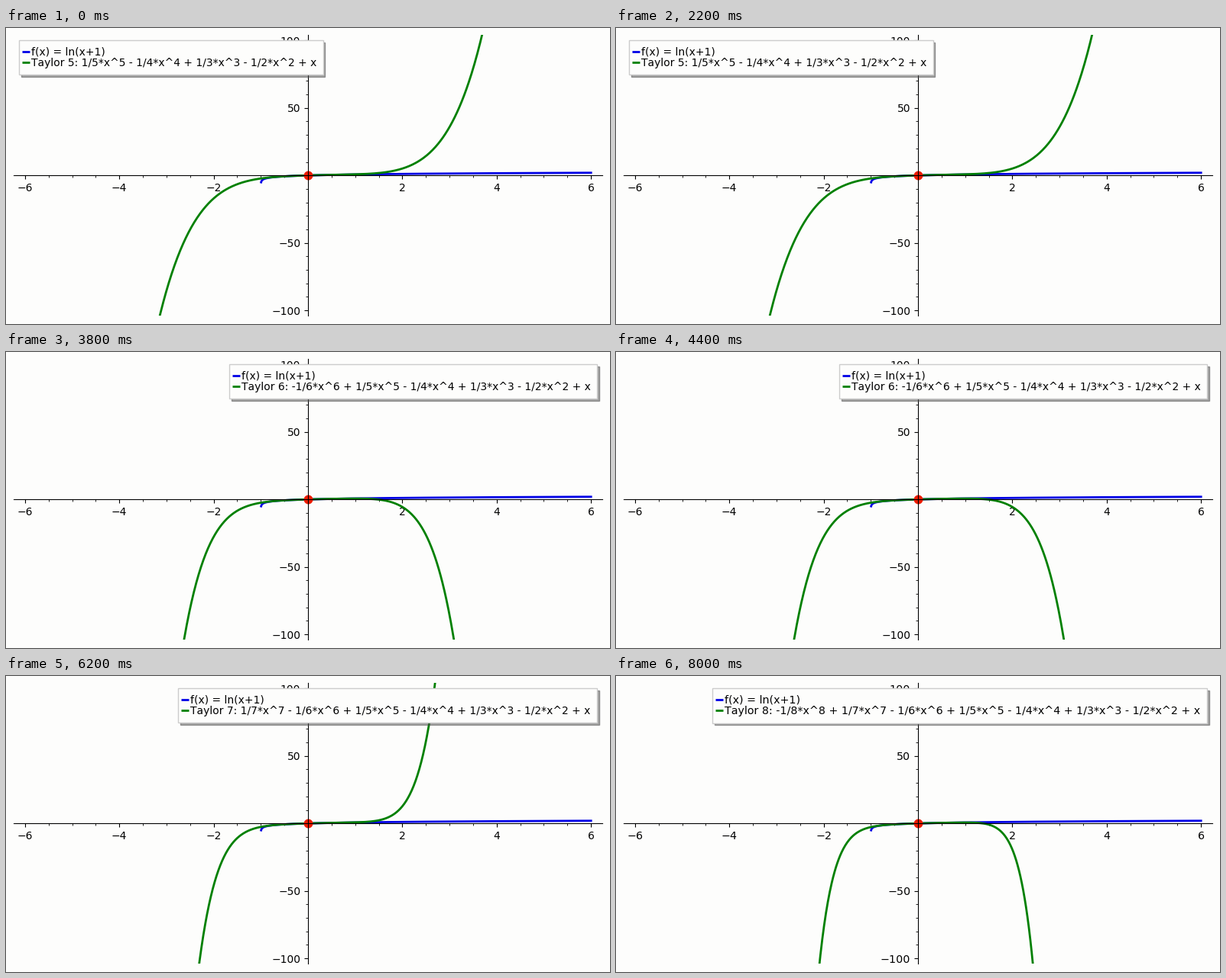
These frames come from a looping animation (790 by 388 pixels, 9600 ms). A matplotlib script:

```python
import numpy as np
import matplotlib.pyplot as plt
from matplotlib.animation import FuncAnimation
from matplotlib.lines import Line2D
from matplotlib.ticker import FuncFormatter, MultipleLocator

WIDTH, HEIGHT, DPI = 790, 388, 100
INTERVAL = 200
FRAMES = 48
TEXT_SIZES = {5: 10, 6: 10, 7: 10, 8: 10.25}  # points, by polynomial order
ORDERS = list(TEXT_SIZES)
PAPER = "#fdfdfc"
BLUE, GREEN, RED = "#0000e6", "#008000", "#ee1c00"

plt.rcParams.update({"font.family": "DejaVu Sans", "font.size": 10,
                     "text.kerning_factor": 6})


def taylor(x, order):
    return sum((-1) ** (k + 1) * x**k / k for k in range(1, order + 1))


def taylor_label(order):
    text = "" if order % 2 else "-"
    for k in range(order, 1, -1):
        text += f"1/{k}*x^{k}" + (" - " if k % 2 else " + ")
    return f"Taylor {order}: {text}x"


def tick_text(value, _):
    return f"{value:.0f}".replace("-", "\u2212") if abs(value) > 1e-9 else ""


def legend_key(color):
    return Line2D([], [], color=color, linestyle="none", marker="_",
                  markersize=7.2, markeredgewidth=2)


fig = plt.figure(figsize=(WIDTH / DPI, HEIGHT / DPI), dpi=DPI, facecolor=PAPER)
ax = fig.add_axes([10 / WIDTH, 10.8 / HEIGHT, 770 / WIDTH, 368 / HEIGHT],
                  facecolor=PAPER)
ax.set(xlim=(-6.24, 6.24), ylim=(-104, 104))
for side in ("left", "bottom"):
    ax.spines[side].set_position(("data", 0))
for side in ("right", "top"):
    ax.spines[side].set_visible(False)
for axis, major, minor in ((ax.xaxis, 2, 0.5), (ax.yaxis, 50, 10)):
    axis.set_major_locator(MultipleLocator(major))
    axis.set_minor_locator(MultipleLocator(minor))
    axis.set_major_formatter(FuncFormatter(tick_text))

# Sample the logarithm evenly in its value, so the steep start stays smooth.
log_y = np.linspace(-5.1, np.log(7), 300)
ax.plot(np.exp(log_y) - 1, log_y, color=BLUE, lw=2)
xs = np.linspace(-6, 6, 1201)
curve, = ax.plot([], [], color=GREEN, lw=2)
ax.plot(0, 0, "o", color=RED, ms=8.6, mew=0, zorder=2.3)
keys = [legend_key(BLUE), legend_key(GREEN)]


def draw(frame):
    order = ORDERS[frame * len(ORDERS) // FRAMES]
    size = TEXT_SIZES[order]
    curve.set_data(xs, taylor(xs, order))
    ax.tick_params(labelsize=size)
    legend = ax.legend(
        keys, ["f(x) = ln(x+1)", taylor_label(order)],
        loc="upper left" if order == 5 else "upper right", fontsize=size,
        handlelength=0.05, handletextpad=0.5, labelspacing=0.02,
        borderpad=0.6, borderaxespad=0.5, numpoints=1, markerscale=1,
        fancybox=False, framealpha=1, facecolor=PAPER, edgecolor="#cccccc",
        shadow=True)
    legend.set_zorder(6)
    return curve, legend


anim = FuncAnimation(fig, draw, frames=FRAMES, interval=INTERVAL,
                     init_func=lambda: draw(0), repeat=True, repeat_delay=0)
plt.show()
```
